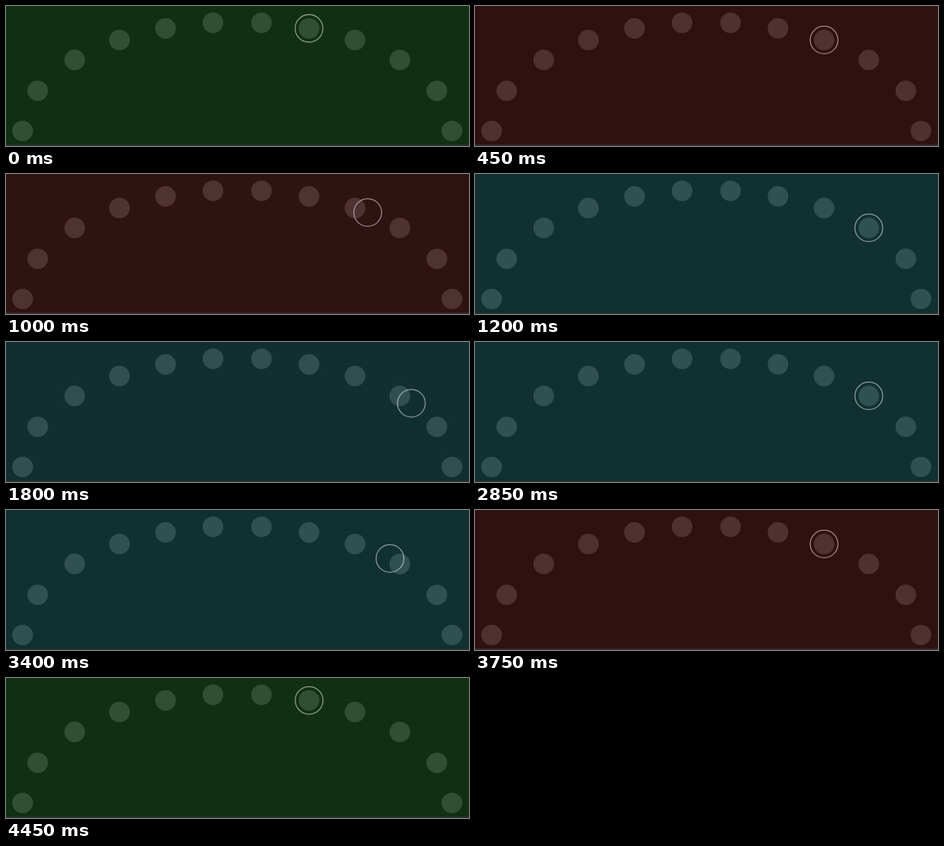
These frames come from a looping animation (600x183 px, 4.8 s). An HTML page:

```html
<!DOCTYPE html>
<html lang="en">
<head>
<meta charset="utf-8">
<title>Colour dial</title>
<style>
  html, body { margin: 0; width: 100%; height: 100%; overflow: hidden; background: #333; }
  svg { display: block; width: 100%; height: 100%; }
</style>
</head>
<body>
<svg viewBox="0 0 600 183" preserveAspectRatio="none">
  <rect id="back" width="600" height="181.4"/>
  <g id="dots"></g>
  <circle id="ring" r="18" fill="none" stroke="#fff" stroke-opacity=".5" stroke-width="1.3"/>
</svg>
<script>
const LOOP = 4800, COUNT = 12, FIRST = 7;
const DARK = 17, LIGHT = 48;
const STARTS = [165, 965, 1765, 2515, 3365, 4165];
const FORTH = 240, BACK = 300;

const $ = id => document.getElementById(id);
const back = $('back'), dots = $('dots'), ring = $('ring');

const clamp = v => Math.min(1, Math.max(0, v));
const lerp = (a, b, p) => a + (b - a) * p;
const easeOut = p => 1 - (1 - p) ** 2;
const smooth = p => p * p * (3 - 2 * p);
const rgb = c => `rgb(${c.map(Math.round).join()})`;

// Background of each stop; the letters name the lit channels
const colors = ['g', 'r', 'gb', 'rb'].map(lit =>
  [...'rgb'].map(ch => lit.includes(ch) ? LIGHT : DARK));

// Point on a half ellipse; the warp evens out the spacing of the dots
function onArc(i) {
  const even = Math.PI * (i / (COUNT - 1) - 0.5);
  const a = even - 0.1396 * Math.sin(2 * even) + 0.018 * Math.sin(4 * even);
  return [299.7 + 278.2 * Math.sin(a), 163.3 - 142.2 * Math.cos(a)];
}

function place(circle, [x, y]) {
  circle.setAttribute('cx', x);
  circle.setAttribute('cy', y);
}

for (let i = 0; i < COUNT; i++) {
  const dot = document.createElementNS('http://www.w3.org/2000/svg', 'circle');
  dot.setAttribute('r', 13.4);
  place(dot, onArc(i));
  dots.append(dot);
}

// Stops run 0, 1, 2, 3 and back again
const stopAfter = n => 3 - Math.abs(3 - n);

function draw(time) {
  const t = time % LOOP;
  const n = STARTS.filter(s => s <= t).length;
  const to = stopAfter(n), from = n ? stopAfter(n - 1) : to;
  const p = n ? easeOut(clamp((t - STARTS[n - 1]) / (to > from ? FORTH : BACK))) : 1;
  const mix = smooth(clamp((p - 0.22) / 0.68));
  const color = colors[from].map((v, k) => lerp(v, colors[to][k], mix));

  back.setAttribute('fill', rgb(color));
  dots.setAttribute('fill', rgb(color.map(v => v + 32)));
  place(ring, onArc(FIRST + lerp(from, to, p)));
}

const begin = performance.now();
function tick() {
  draw(performance.now() - begin);
  requestAnimationFrame(tick);
}
tick();
</script>
</body>
</html>
```
